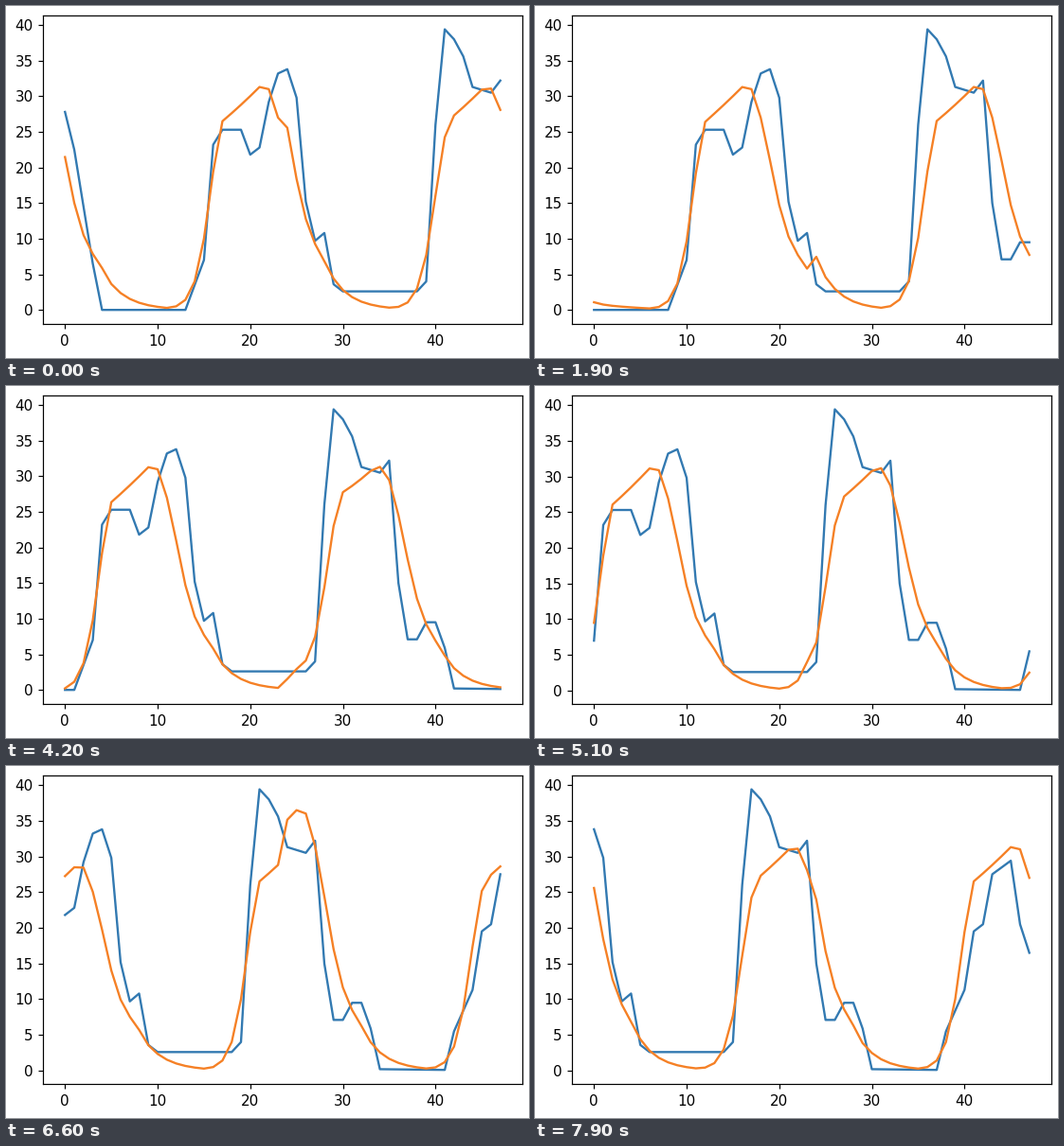
A matplotlib script that plays this animation: 552x372 px, repeating every 8000 ms.

```python
import numpy as np
import matplotlib.pyplot as plt
from matplotlib.animation import FuncAnimation

W, H, DPI = 552, 372, 96
FRAME_MS, FRAMES = 100, 80
STEP_MS = 327          # the window moves on by one hour each step
DAY = 24
SCALE = 1.13           # enlarges the default plot style to the stage

plt.rcParams.update({"font.family": "DejaVu Sans", "font.size": 10 * SCALE,
                     "lines.linewidth": 1.55 * SCALE,
                     "axes.linewidth": 0.8 * SCALE})
for axis in ("xtick", "ytick"):
    plt.rcParams.update({f"{axis}.major.size": 3.5 * SCALE,
                         f"{axis}.major.pad": 3.5 * SCALE,
                         f"{axis}.major.width": 0.8 * SCALE})

# Corners of the measured curve: (hour, value)
CORNERS = [
    (0, 27.8), (1, 22.5), (3, 6.5), (4, 0), (13, 0), (15, 7), (16, 23.2),
    (17, 25.3), (19, 25.3), (20, 21.8), (21, 22.8), (22, 29.2), (23, 33.2),
    (24, 33.8), (25, 29.8), (26, 15.2), (27, 9.7), (28, 10.8), (29, 3.6),
    (30, 2.6), (38, 2.6), (39, 4), (40, 26), (41, 39.4), (42, 38), (43, 35.6),
    (44, 31.3), (46, 30.5), (47, 32.2), (48, 15), (49, 7.1), (50, 7.1),
    (51, 9.5), (52, 9.5), (53, 5.9), (54, 0.2), (61, 0.1), (62, 5.5),
    (64, 11.3), (65, 19.5), (66, 20.5), (67, 27.5), (69, 29.4), (70, 20.5),
    (71, 16.5),
]
# Corners of a typical day, joined by exponential curves
TYPICAL = [
    (0, 21), (2, 10.3), (4, 5.8), (5, 3.6), (11, 0.28), (12, 0.5), (14, 4),
    (15, 10), (16, 19.4), (17, 26.5), (21, 31.3), (22, 31), (23, 27),
]

actual = np.interp(np.arange(3 * DAY), *zip(*CORNERS))
typical_hours, typical_values = zip(*TYPICAL)


def day_curve(hour):
    return np.exp(np.interp(hour, typical_hours, np.log(typical_values),
                            period=DAY))


def forecast(start):
    """Predict one day, corrected by the error of the hour before it."""
    lag = np.interp(start, [22, 29, 47], [0, 1, 0])
    ahead = np.arange(DAY)
    base = day_curve(start + ahead - lag)

    seen, expected = actual[max(start - 1, 0)], day_curve(start - 1 - lag)
    limit = abs(seen - expected)
    gain = max(seen / expected, 0.2) ** 0.75
    correction = np.clip(base * (gain - 1), -limit, limit)
    return base + correction * np.exp(-(ahead / 6) ** 2)


fig = plt.figure(figsize=(W / DPI, H / DPI), dpi=DPI, facecolor="white")
ax = fig.add_axes([39.3 / W, 1 - 336 / H, 505.4 / W, 326.2 / H])
hours = np.arange(2 * DAY)
measured, = ax.plot(hours, actual[:2 * DAY], color="#3279b1")
predicted, = ax.plot(hours, actual[:2 * DAY], color="#f58025")


def update(i):
    start = i * FRAME_MS // STEP_MS
    measured.set_ydata(actual[start:start + 2 * DAY])
    predicted.set_ydata(np.append(forecast(start), forecast(start + DAY)))
    ax.relim()
    ax.autoscale_view()
    return measured, predicted


anim = FuncAnimation(fig, update, frames=FRAMES, interval=FRAME_MS,
                     repeat=True, repeat_delay=0, blit=False)
plt.show()
```
